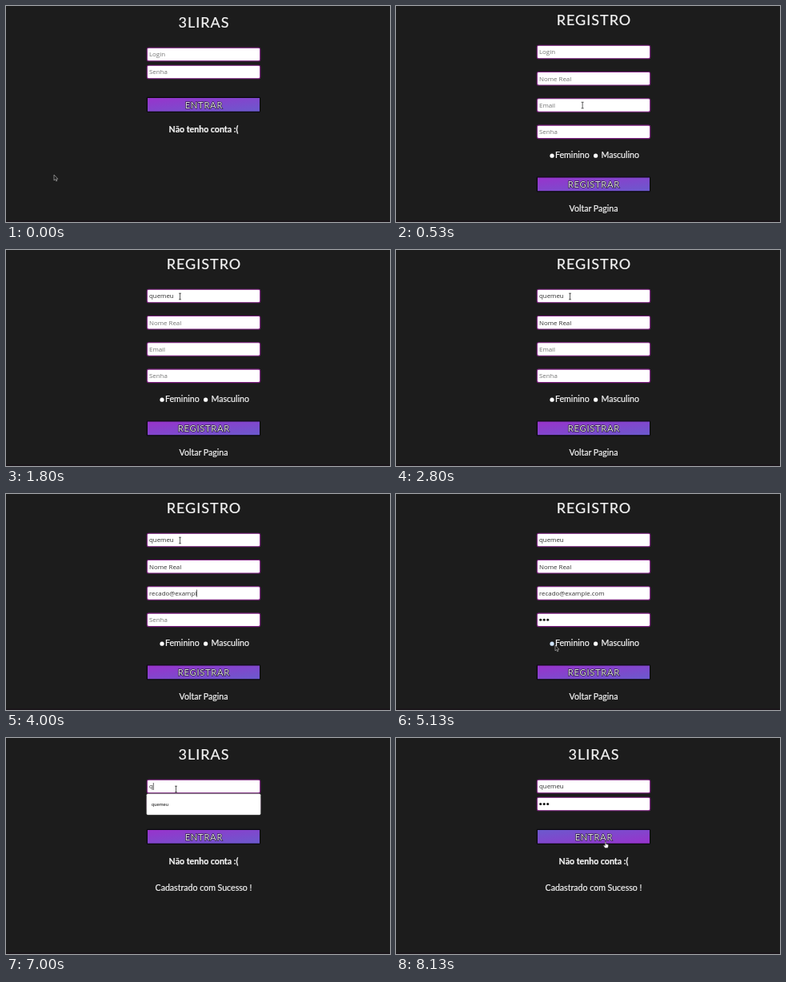
An HTML page for the animation above (8.19 s loop, 480 by 270 pixels).

```html
<!DOCTYPE html>
<html lang="pt">
<head>
<meta charset="utf-8">
<style>
html, body { margin: 0; width: 100%; height: 100%; overflow: hidden; background: #1c1c1c; }
svg { display: block; width: 480px; height: 270px; }
text { font-family: Lato, "Open Sans", sans-serif; font-size: 10.6px; fill: #f4f4f4; stroke: #f4f4f4; stroke-width: .22px; }
.mid { text-anchor: middle; }
.title { font-size: 18px; letter-spacing: 1px; }
.label { font-size: 11.2px; letter-spacing: .7px; fill: #e2dfe6; stroke: #15101c; stroke-width: 1.1px; paint-order: stroke; }
.bold { font-weight: 700; }
.value { font-family: "Open Sans", "Noto Sans", sans-serif; font-size: 7.9px; fill: #333; stroke: none; }
.hint { fill: #757575; }
.option { font-family: "Liberation Sans", Arial, sans-serif; font-size: 5.8px; fill: #111; stroke: none; }
</style>
</head>
<body>
<svg id="stage" viewBox="0 0 480 270">
  <defs>
    <linearGradient id="rest" x1="0" y1="0" x2="1" y2="1">
      <stop stop-color="#9932cc"/><stop offset="1" stop-color="#6a5acd"/>
    </linearGradient>
    <linearGradient id="hover" x1="0" y1="0" x2="1" y2="1">
      <stop stop-color="#6a5acd"/><stop offset="1" stop-color="#9932cc"/>
    </linearGradient>
  </defs>
  <rect width="480" height="270" fill="#1c1c1c"/>
  <rect y="268" width="480" height="2" fill="#1b161a"/>
</svg>
<script>
const LOOP = 8190, STEP = 1000 / 15;
const OPEN_FORM = 460, SENT = 6660;
const USER = "quemeu", MAIL = "recado@example.com";
const stage = document.getElementById("stage");

function add(parent, tag, attrs, content) {
  const el = document.createElementNS("http://www.w3.org/2000/svg", tag);
  for (const key in attrs) el.setAttribute(key, attrs[key]);
  if (content) el.textContent = content;
  parent.append(el);
  return el;
}
const show = (el, on) => el.setAttribute("visibility", on ? "inherit" : "hidden");
const group = () => add(stage, "g", {});
const words = (parent, x, y, cls, content) => add(parent, "text", { x, y, class: cls }, content);

function field(parent, y, hint) {
  add(parent, "rect", { x: 176.3, y: y + .2, width: 141.4, height: 16.5, rx: 2, fill: "#fff", stroke: "#7d1f80", "stroke-width": 1.1 });
  const text = words(parent, 179, y + 11.2, "value hint", hint);
  const dots = [0, 1, 2].map(i => add(parent, "circle", { cx: 180.7 + i * 4.5, cy: y + 8.4, r: 1.5, fill: "#111" }));
  const caret = add(parent, "rect", { y: y + 4, width: .7, height: 9, fill: "#222" });
  return { set(value, focus, secret) {
    const n = value.length;
    text.textContent = n ? (secret ? "" : value) : hint;
    text.setAttribute("class", n ? "value" : "value hint");
    dots.forEach((dot, i) => show(dot, secret && i < n));
    const width = !n ? 0 : secret ? n * 4.5 : text.getComputedTextLength();
    caret.setAttribute("x", 179 + width);
    show(caret, focus);
  } };
}

function button(parent, y, label) {
  const g = add(parent, "g", { transform: `translate(0 ${y + 9.3})` });
  const face = add(g, "rect", { x: 176.4, y: -9, width: 141.2, height: 18, rx: .5, "stroke-width": 1.2 });
  words(g, 247.4, 4.4, "mid label", label);
  return (over, pressed) => {
    face.setAttribute("fill", over ? "url(#hover)" : "url(#rest)");
    face.setAttribute("stroke", pressed ? "#1b1c50" : "#0b0910");
  };
}

// Login page
const login = group();
words(login, 247.5, 27.3, "mid title", "3LIRAS");
const loginUser = field(login, 52, "Login");
const loginPass = field(login, 74, "Senha");
const enter = button(login, 114, "ENTRAR");
words(login, 247, 157.6, "mid bold", "Não tenho conta :(");
const success = words(login, 247, 190.7, "mid", "Cadastrado com Sucesso !");
const menu = add(login, "g", {});
add(menu, "rect", { x: 175.8, y: 69.8, width: 142.4, height: 26.2, rx: 1.5, fill: "#fff", stroke: "#bbb", "stroke-width": .4 });
words(menu, 182, 85, "option", USER);

// Sign-up page
const form = group();
words(form, 247.5, 24.3, "mid title", "REGISTRO");
const inputs = ["Login", "Nome Real", "Email", "Senha"].map((hint, i) => field(form, 49 + i * 33.3, hint));
const radio = add(form, "circle", { cx: 195, cy: 187.2, r: 2.6 });
const tick = add(form, "circle", { cx: 195, cy: 187.2, r: 1.3, fill: "#222" });
add(form, "circle", { cx: 249.6, cy: 187.2, r: 2.6, fill: "#fff" });
words(form, 199, 190.4, "", "Feminino");
words(form, 256.5, 190.4, "", "Masculino");
const register = button(form, 213.5, "REGISTRAR");
words(form, 247, 257.4, "mid", "Voltar Pagina");

// Pointers, each with its hot spot at 0,0
const pointer = group();
const shapes = {
  arrow: add(pointer, "path", { d: "M0 0V7L1.6 5.6 2.8 8 3.9 7.4 2.8 5.2H4.8Z", fill: "#161616", stroke: "#c4c4c4", "stroke-width": .6 }),
  beam: add(pointer, "path", { d: "M-1.5-3.8H1.5M0-3.8V3.8M-1.5 3.8H1.5", fill: "none", stroke: "#333", "stroke-width": .8 }),
  hand: add(pointer, "path", { d: "M-.7 0H.5V3L3.4 3.7V6L2.6 8H-.8L-2.7 5-1.9 4.3-.7 5.2Z", fill: "#fff", stroke: "#222", "stroke-width": .5 })
};

const PATH = [
  [60, 60, 211], [200, 130, 194], [330, 232, 156], [460, 240, 153], [660, 217.5, 58],
  [4800, 217.5, 58], [5000, 186, 165], [5130, 199, 189], [5270, 194, 186],
  [5470, 194, 186], [5730, 207, 194], [5930, 241, 227], [6130, 233, 213.8],
  [6660, 233, 213.8], [6860, 212.5, 64], [7800, 212.5, 64], [8130, 262, 129.5]
];
function place(t) {
  const i = PATH.findIndex(p => p[0] > t);
  if (i < 0) return PATH[PATH.length - 1].slice(1);
  if (!i) return PATH[0].slice(1);
  const [t0, x0, y0] = PATH[i - 1], [t1, x1, y1] = PATH[i];
  const u = (t - t0) / (t1 - t0), k = u * u * (3 - 2 * u);
  return [x0 + (x1 - x0) * k, y0 + (y1 - y0) * k];
}

// value, focus, first key, last key, caret off
const TYPING = [
  [USER, 730, 800, 1530, 1730],
  ["Nome Real", 1930, 2070, 2600, 2730],
  [MAIL, 2930, 3000, 4330, 4530],
  ["123", 4530, 4600, 4730, 4870]
];
const LOGIN_PASS = ["123", 7470, 7530, 7730, 7860];
function typed(t, [value, , first, last]) {
  if (t < first) return "";
  return value.slice(0, 1 + Math.floor((t - first) / (last - first) * (value.length - 1) + .01));
}

function render(t) {
  const onForm = t >= OPEN_FORM && t < SENT;
  show(form, onForm);
  show(login, !onForm);
  const [x, y] = place(t);
  const inX = x > 176 && x < 318;
  let kind = "arrow";

  if (onForm) {
    TYPING.forEach((row, i) => inputs[i].set(typed(t, row), t >= row[1] && t < row[4], i === 3));
    const over = inX && y > 213 && y < 233;
    const near = Math.hypot(x - 195, y - 187) < 6;
    radio.setAttribute("fill", near ? "#cfe4fb" : "#fff");
    show(tick, t >= 5400);
    register(over, t >= 6400);
    const inField = inX && [0, 1, 2, 3].some(i => y > 49 + i * 33.3 && y < 66 + i * 33.3);
    kind = over ? "hand" : inField ? "beam" : "arrow";
  } else {
    const chosen = t >= 7200, over = inX && y > 114 && y < 133;
    loginUser.set(chosen ? USER : t >= 6990 ? USER[0] : "", t >= 6930 && t < 7330, false);
    loginPass.set(typed(t, LOGIN_PASS), t >= LOGIN_PASS[1] && t < LOGIN_PASS[4], true);
    show(success, t >= SENT);
    show(menu, t >= 6990 && !chosen);
    enter(over, false);
    const onLink = x > 203 && x < 291 && y > 148 && y < 160;
    const inField = inX && (y > 52 && y < 69 || y > 74 && y < 91);
    kind = over || onLink ? "hand" : inField ? "beam" : "arrow";
  }
  pointer.setAttribute("transform", `translate(${x.toFixed(2)} ${y.toFixed(2)})`);
  for (const name in shapes) show(shapes[name], name === kind);
}

const start = performance.now();
function play(now) {
  const t = Math.max(0, now - start) % LOOP;
  render(Math.floor((t + 4) / STEP) * STEP);
  requestAnimationFrame(play);
}
render(0);
requestAnimationFrame(play);
</script>
</body>
</html>
```
